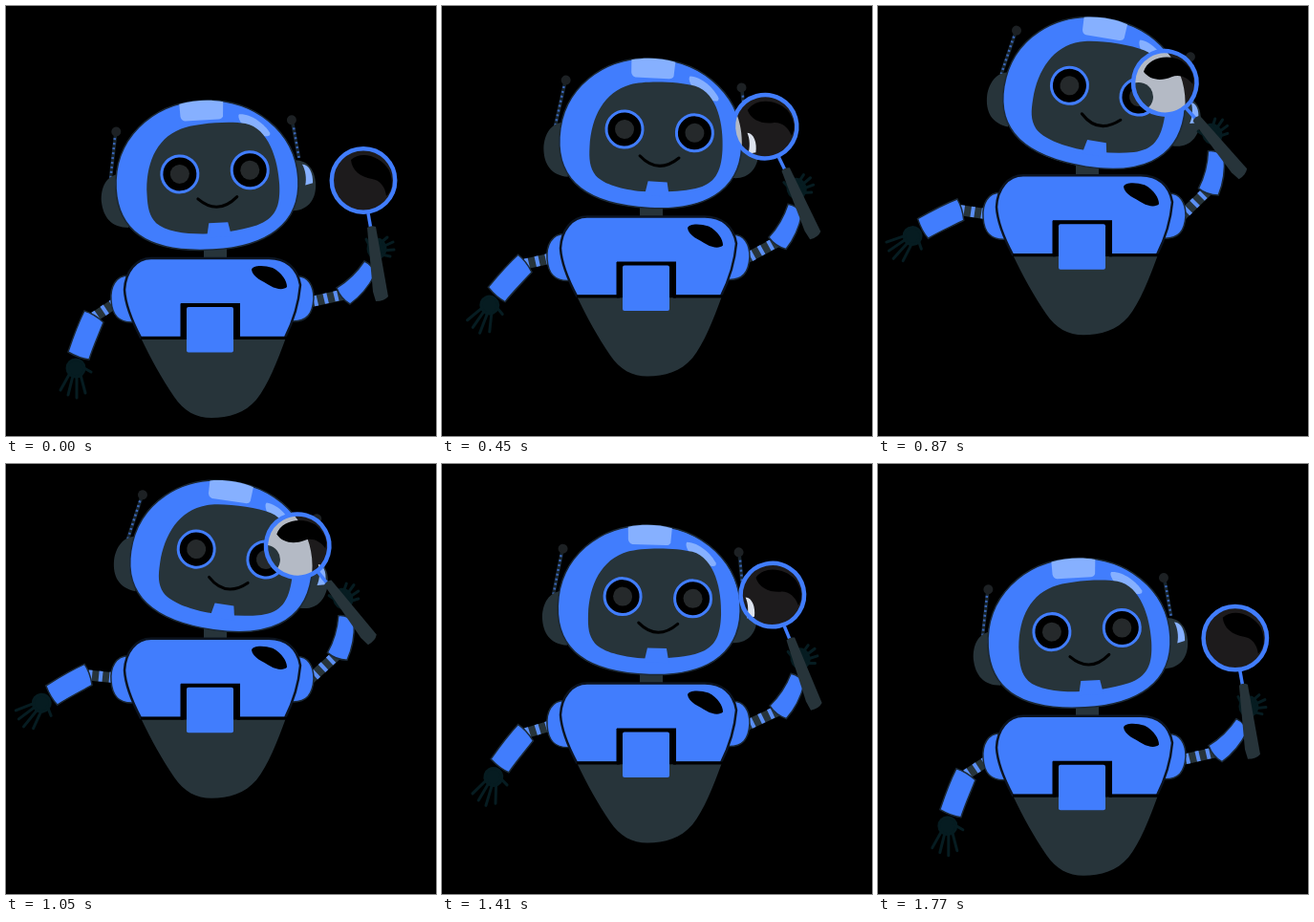
These frames come from a looping animation (450 px wide and 450 px high, 1800 ms). An HTML page:

```html
<!DOCTYPE html>
<html lang="en">
<head>
<meta charset="utf-8">
<title>Robot with magnifying glass</title>
<style>
  html, body { margin: 0; width: 100%; height: 100%; overflow: hidden; background: #000; }
  svg { display: block; width: 100vw; height: 100vh; }
  .blue { fill: #417dfd; }
  .dark { fill: #27343a; }
  .light { fill: #86b0ff; }
  .edge { stroke: #1b2936; stroke-width: 1.5; }
  .line { fill: none; stroke: #000; stroke-width: 3; }
  .tube { stroke: #27343a; stroke-width: 11; }
  .bands { stroke: #5b8ff5; stroke-width: 11; stroke-dasharray: 4 7; }
  .wire { stroke: #17242d; stroke-width: 3.5; }
  .coil { stroke: #3a66b8; stroke-width: 2.5; stroke-dasharray: 2 3; }
  .ball { fill: #1d2124; }
  .hand { fill: #061c21; stroke: #061c21; stroke-linecap: round; stroke-width: 3; }
  .ring { fill: none; stroke: #417dfd; }
</style>
</head>
<body>
<svg viewBox="0 0 450 450">
  <defs>
    <path id="helmet" d="M119 186C119 135 160 98.500 213 98.500C268 98.500 310 136 310 186C310 234 272 255 217 255C157 255 119 236 119 186Z"/>
    <path id="glint" d="M315 171C322 171 326 181 325 191L317 193C319 186 318 177 315 171Z"/>
    <g id="eye">
      <circle r="19" fill="#000" stroke="#417dfd" stroke-width="3"/>
      <circle r="10" fill="#25292b"/>
    </g>
    <clipPath id="lens"><circle class="arm" cx="374" cy="182.500" r="33"/></clipPath>
  </defs>

  <g id="robot">
    <path class="dark" d="M207 250H231V266H207Z"/>

    <g class="head">
      <path class="wire" d="M114 174L122 127M312 164L307 125"/>
      <path class="coil" d="M114 174L121 131M312 164L308 130"/>
      <circle class="ball" cx="122.500" cy="126" r="5"/>
      <circle class="ball" cx="306.500" cy="124" r="5"/>
      <path class="dark" d="M124 170C109 171 103 184 103 198C104 215 112 226 130 227ZM304 166C321 165 328 178 328 191C328 207 320 219 303 219Z"/>
      <use href="#glint" class="light"/>
      <use href="#helmet" class="blue edge"/>
      <path class="light" d="M190 101C205 97.500 222 97.500 236 101L235 116Q234 119 230 119H195Q191 118 190.500 114Z"/>
      <path class="light" d="M252 115C265 115 278 127 283 136C284 140 280 140 276 139C266 136 257 129 253 123Q250 117 252 115Z"/>
      <path class="dark" d="M151 194C151 163 163 136 190 127C205 122 240 121 258 125C282 131 290 165 290 190C290 214 284 226 264 232C245 237 225 238 208 238C188 237 168 233 159 224C152 216 151 207 151 194Z"/>
      <path class="blue" d="M214 227H234L237 242H211Z"/>
      <use href="#eye" x="186.500" y="174"/>
      <use href="#eye" x="260" y="174"/>
      <path class="line" stroke-linecap="round" d="M204 201Q224 220 245 201"/>
    </g>

    <g id="rest">
      <path class="tube" d="M122 306L90 327"/>
      <path class="bands" d="M114 311L90 327"/>
      <path class="blue edge" d="M82 319Q92 322 102 331C97 344 91 357 87 370Q77 369 65 362C70 347 75 333 82 319Z"/>
      <ellipse class="hand" cx="73" cy="379" rx="9" ry="9"/>
      <path class="hand" d="M67 384L57 402M70 387L65 407M74 387L74 410M78 386L83 405M80 378L89 383"/>
    </g>

    <g class="arm">
      <path class="tube" d="M312 311L354 302"/>
      <path class="bands" d="M322 309L352 302"/>
      <path class="blue edge" d="M346 295C356 289 367 279 375 267Q384 271 386 281C380 293 371 304 360 312Q350 306 346 295Z"/>
      <ellipse class="hand" cx="388" cy="254" rx="9" ry="10"/>
      <path class="hand" d="M382 254L377 244M392 248L399 242M394 252L405 247M394 256L406 255M393 260L402 262"/>
      <path class="ring" stroke-width="3.500" d="M379 217L382 234"/>
      <path class="dark" d="M378 232Q382 229 387 231L400 304Q396 309 387 309L384 299Z"/>
      <circle cx="374" cy="182.500" r="33" fill="#1d1b1c"/>
    </g>
    <g clip-path="url(#lens)">
      <g class="head">
        <use href="#helmet" fill="#b4bac5"/>
        <circle class="dark" cx="260" cy="174" r="15"/>
        <use href="#glint" fill="#dde3ee"/>
      </g>
    </g>
    <g class="arm">
      <path d="M361 161C372 151 392 157 401 172C406 184 404 194 398 199C397 189 391 182 383 181C371 179 362 172 361 161Z"/>
      <circle class="ring" cx="374" cy="182.500" r="33.200" stroke-width="4.500"/>
    </g>

    <path class="blue edge" d="M130 282C114 281 109 295 110 308C111 324 118 332 134 331ZM302 283C317 281 322 294 322 306C321 322 315 331 298 330Z"/>
    <path class="dark" d="M141 347H293C284 372 274 397 262 412C250 426 233 431 215 431C199 431 186 424 176 409C163 390 152 370 141 347Z"/>
    <path class="blue" stroke="#0c1420" stroke-width="2.500" d="M152 264H275C293 264 305 274 308 292C306 315 299 333 292 347H141C132 330 125 314 124 297C125 278 136 264 152 264Z"/>
    <path d="M183 311H245V349H183Z"/>
    <path class="line" d="M141 347.500H184V313H243V347.500H294"/>
    <path class="dark" d="M187 349H242V365H187Z"/>
    <rect class="blue" x="189" y="315" width="49" height="47.500" rx="2"/>
    <path d="M257 276C258 271 270 271 279 274C289 279 294 288 294 294C291 297 284 297 277 293C269 288 258 284 257 276Z"/>
  </g>
</svg>
<script>
  const LOOP = 1800, STEP = 30;
  const robot = document.getElementById('robot');
  const rest = document.getElementById('rest');
  const heads = document.querySelectorAll('.head');
  const arms = document.querySelectorAll('.arm');
  const turn = (el, angle, x, y) => el.setAttribute('transform', `rotate(${angle} ${x} ${y})`);

  function draw(now) {
    const t = Math.floor(now % LOOP / STEP) * STEP;
    const lift = (1 - Math.cos(2 * Math.PI * t / LOOP)) / 2;
    robot.setAttribute('transform', `translate(0 ${-87 * lift})`);
    heads.forEach(el => turn(el, 12.5 * lift - 3.2, 218, 258));
    arms.forEach(el => turn(el, -31.7 * lift, 310, 305));
    turn(rest, 42 * lift, 122, 305);
  }

  let start;
  function tick(now) {
    start ??= now;
    draw(now - start);
    requestAnimationFrame(tick);
  }
  draw(0);
  requestAnimationFrame(tick);
</script>
</body>
</html>
```
